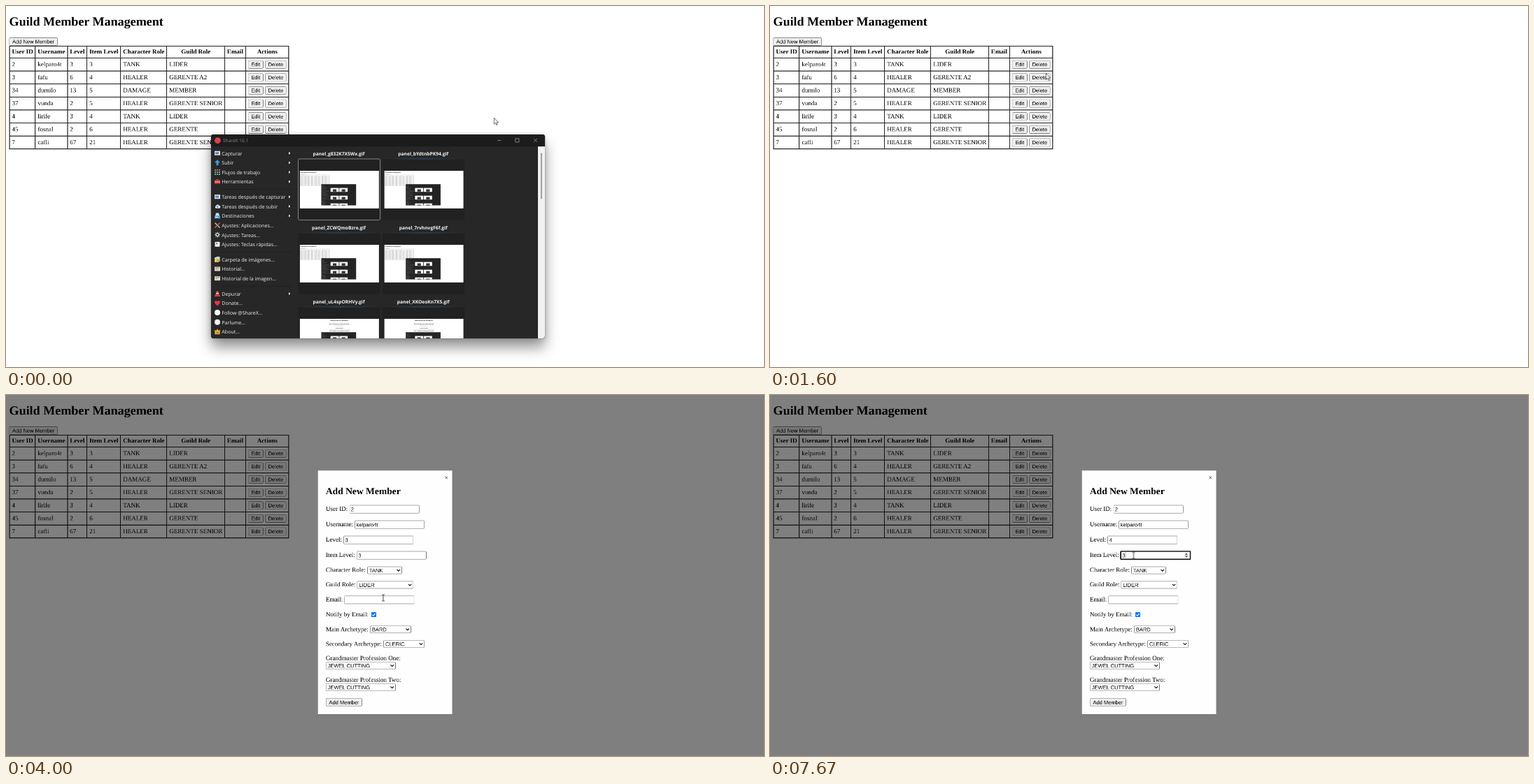
These frames come from a looping animation (1083 by 517 pixels, 8000 ms). An HTML page:

```html
<!DOCTYPE html>
<html lang="en">
<head>
<meta charset="utf-8">
<title>Guild Member Management</title>
<style>
  html, body { margin: 0; width: 100%; height: 100%; overflow: hidden; background: #fff; }
  #stage { position: relative; width: 1083px; height: 517px; overflow: hidden; cursor: default; }
  /* The page is laid out and rastered at 1920 px, then shown reduced. */
  #page { position: absolute; width: 1920px; height: 917px; background: #fff; transform: scale(.5641); transform-origin: 0 0;
    will-change: transform; text-rendering: geometricPrecision; font: 16px/18px "Liberation Serif", serif; color: #000; }
  h1 { position: absolute; left: 8px; top: 21.4px; margin: 0; font-size: 32px; line-height: 37px; white-space: nowrap; }
  .btn, .box { box-sizing: border-box; display: inline-block; position: relative; white-space: pre;
    font: 13.333px/19px "Liberation Sans", Arial, sans-serif; border: 1px solid #767676; border-radius: 3px; }
  .btn { height: 21px; padding: 0 7px; background: #efefef; vertical-align: top; }
  .btn.pressed { background: #f5f5f5; border-color: #8d8d8d; }
  #add { position: absolute; left: 8px; top: 80px; }
  table { position: absolute; left: 8px; top: 101px; border-collapse: collapse; }
  th, td { border: 2px solid #222; padding: 5px; height: 18px; white-space: nowrap; text-align: left; }
  th { text-align: center; }
  td { height: 21px; }
  #modal { position: absolute; inset: 0 0 -10px; background: rgba(0, 0, 0, .5); }
  #dialog { position: absolute; left: 790px; top: 192px; width: 340px; height: 618px; background: #fefefe; }
  h2 { position: absolute; left: 20px; top: 40px; margin: 0; font-size: 24px; line-height: 27px; white-space: nowrap; }
  #close { position: absolute; right: 10px; top: 10px; }
  .row { position: absolute; left: 20px; display: flex; align-items: center; gap: 4px;
    transform: translateY(-50%); white-space: nowrap; }
  .box { height: 21px; width: 177px; padding-left: 3px; background: #fff; border-radius: 2px; }
  .select { height: 19px; line-height: 17px; padding-left: 4px; }
  .box svg { position: absolute; right: 2px; top: 1px; }
  .focus { border-color: #101010; box-shadow: 0 0 0 1px #101010, inset 0 0 0 1px #101010; }
  .caret { display: inline-block; width: 1px; height: 15px; background: #000; vertical-align: middle; margin-top: -2px; }
  .check { width: 13px; height: 13px; margin: -2px 0 0 3px; }
  #win { position: absolute; left: 293px; top: 184px; width: 476.5px; height: 291.5px; border-radius: 4px;
    overflow: hidden; background: #272727; box-shadow: 0 0 1px #000, 0 13px 19px rgba(0, 0, 0, .42), 0 1px 8px rgba(0, 0, 0, .15); }
  #win svg { display: block; font: 7.1px "Open Sans", "Noto Sans", sans-serif; }
  #cursor { position: absolute; left: 0; top: 0; overflow: visible; transform-origin: 0 0; }
</style>
</head>
<body>
<div id="stage">
  <div id="page">
    <h1>Guild Member Management</h1>
    <span class="btn" id="add">Add New Member</span>
    <table id="members"></table>
    <div id="modal"><div id="dialog"><span id="close">×</span><h2>Add New Member</h2></div></div>
  </div>
  <div id="win"></div>
  <svg id="cursor" width="20" height="20">
    <path id="arrow" d="M.5 .5V16.5L4.2 13 6.6 18.6 9 17.6 6.7 12.1H11.7Z" fill="#fff" stroke="#000"/>
    <path id="beam" d="M-3.5 -8H-1Q0 -8 0 -7Q0 -8 1 -8H3.5M0 -7V7M-3.5 8H-1Q0 8 0 7Q0 8 1 8H3.5" fill="none" stroke="#000" stroke-width="1.3"/>
  </svg>
</div>
<script>
const $ = id => document.getElementById(id);
const SCALE = 1083 / 1920;

// Member table
const heads = ["User ID", "Username", "Level", "Item Level", "Character Role", "Guild Role", "Email", "Actions"];
const members = [
  [2, "kelparo4t", 3, 3, "TANK", "LIDER"],
  [3, "fafu", 6, 4, "HEALER", "GERENTE A2"],
  [34, "durnilo", 13, 5, "DAMAGE", "MEMBER"],
  [37, "vunda", 2, 5, "HEALER", "GERENTE SENIOR"],
  [4, "lirife", 3, 4, "TANK", "LIDER"],
  [45, "fosnal", 2, 6, "HEALER", "GERENTE"],
  [7, "cafli", 67, 21, "HEALER", "GERENTE SENIOR"]
];
const button = text => `<span class="btn">${text}</span>`;
const cells = (tag, list) => `<tr>${list.map(c => `<${tag}>${c}</${tag}>`).join("")}</tr>`;
$("members").innerHTML = cells("th", heads) +
  members.map(m => cells("td", [...m, "", button("Edit") + " " + button("Delete")])).join("");

// Dialog form; y is the middle of each row on the page
const input = (text, id = "") => `<span class="box" id="${id}"><span class="value">${text}</span>` +
  (id && `<span class="caret"></span><svg class="spin" width="15" height="17"><path d="M2 1H13V16H2Z" fill="#efefef"/>` +
  `<path d="M4 7 7.5 3 11 7ZM4 10 7.5 14 11 10Z" fill="#444"/></svg>`) + `</span>`;
const select = (text, width) => `<span class="box select" style="width:${width}px">${text}` +
  `<svg width="12" height="15"><path d="M2 5.5 6 9.5 10 5.5" fill="none" stroke="#000" stroke-width="1.8"/></svg></span>`;
const check = `<svg class="check"><rect width="13" height="13" rx="2" fill="#0075ff"/>` +
  `<path d="M2.5 6.8 5.3 9.5 10.5 3.6" fill="none" stroke="#fff" stroke-width="2"/></svg>`;
const rows = [
  [289.5, "User ID:", input(2)],
  [328.5, "Username:", input("kelparo4t")],
  [367.5, "Level:", input(3, "level")],
  [406.5, "Item Level:", input(3, "item")],
  [444.5, "Character Role:", select("TANK", 88)],
  [481.5, "Guild Role:", select("LIDER", 143)],
  [519.5, "Email:", input("")],
  [558, "Notify by Email:", check],
  [595, "Main Archetype:", select("BARD", 104)],
  [632, "Secondary Archetype:", select("CLERIC", 104)],
  [669, "Grandmaster Profession One:", ""],
  [687, "", select("JEWEL CUTTING", 177)],
  [724, "Grandmaster Profession Two:", ""],
  [742, "", select("JEWEL CUTTING", 177)],
  [780, "", button("Add Member")]
];
$("dialog").innerHTML += rows.map(([y, label, control]) =>
  `<div class="row" style="top:${y - 192}px">${label && `<span>${label}</span>`}${control}</div>`).join("");

// Capture tool window, drawn in stage coordinates
const rect = (x, y, w, h, fill, more = "") => `<rect x="${x}" y="${y}" width="${w}" height="${h}" fill="${fill}" ${more}/>`;
const path = (d, fill, more = "") => `<path d="${d}" fill="${fill}" ${more}/>`;
const line = (d, color, width = 1, more = "") => path(d, "none", `stroke="${color}" stroke-width="${width}" ${more}`);
const dot = color => `<circle cx="4" cy="4" r="4" fill="${color}"/>`;
const text = (x, y, str, more = 'fill="#eee"') => `<text x="${x}" y="${y}" ${more}>${str}</text>`;
const icons = {
  screen: rect(0, 1, 8, 6, "#dfe6ee") + rect(1, 2.5, 5, 3, "#4f86bd"),
  up: path("M4 0 8 4H5.5V8H2.5V4H0Z", "#3f9be8"),
  grid: ["#e05a5a", "#5aa0e0", "#62c06a"].map((c, i) => [0, 3, 6].map(x => rect(x, i * 3, 2, 2, c)).join("")).join(""),
  toolbox: rect(0, 2, 8, 5, "#d8403c") + rect(0, 4, 8, .8, "#f3d9d4") + line("M2.5 2V1H5.5V2", "#d8403c"),
  cloud: path("M2 7A2 2 0 0 1 2 3.4A2.4 2.4 0 0 1 6.4 3A2 2 0 0 1 6.4 7Z", "#e4eaf2") + path("M4 3 5.6 5H4.6V7H3.4V5H2.4Z", "#4a85c0"),
  drive: rect(0, 4, 8, 4, "#4d9be6") + path("M2 0H6L7 4H1Z", "#cfe2f5") + rect(1, 5.5, 4, 1, "#e8f2fc"),
  tools: line("M.5 .5 7.5 7.5", "#ccc", 1.3) + line("M7.5 .5 .5 7.5", "#d8594f", 1.4),
  gear: `<circle cx="4" cy="4" r="2" fill="none" stroke="#ddd" stroke-width="1.3"/>` +
    line("M4 0V1.6M4 6.4V8M0 4H1.6M6.4 4H8M1.2 1.2 2.3 2.3M5.7 5.7 6.8 6.8M6.8 1.2 5.7 2.3M2.3 5.7 1.2 6.8", "#ddd"),
  key: rect(.5, .5, 7, 7, "#eee", 'rx="1"') + rect(2, 2, 2, 2, "#777"),
  folder: rect(0, 1, 6, 7, "#e8c860") + rect(2.5, 0, 5, 5, "#b9d7f0") + rect(3, 4, 5, 3, "#d0a83c"),
  list: rect(0, 1, 8, 6, "#e4dccb") + rect(1, 2, 6, 1, "#a58a60") + rect(1, 4, 4, 1, "#999"),
  cone: path("M3 0H5L7 6.5H1Z", "#e0473c") + rect(0, 6.5, 8, 1.5, "#e0473c") + rect(2, 3, 4, 1.2, "#f5e7e2"),
  heart: path("M4 8C-2 3.5 .3 .4 2.2 .6Q3.5 .7 4 2Q4.5 .7 5.8 .6C7.7 .4 10 3.5 4 8Z", "#e8304a"),
  white: dot("#fff"),
  pale: dot("#f2f2f6"),
  crown: path("M0 1 2 3 4 0 6 3 8 1 7.5 8H.5Z", "#e3b341") + rect(2, 5, 4, 1.5, "#b5651d")
};
const menu = [
  [211, ["Capturar", "screen", 1], ["Subir", "up", 1], ["Flujos de trabajo", "grid", 1], ["Herramientas", "toolbox", 1]],
  [273.5, ["Tareas después de capturar", "screen", 1], ["Tareas después de subir", "cloud", 1], ["Destinaciones", "drive", 1],
    ["Ajustes: Aplicaciones...", "tools"], ["Ajustes: Tareas...", "gear"], ["Ajustes: Teclas rápidas...", "key"]],
  [363.2, ["Carpeta de imágenes...", "folder"], ["Historial...", "list"], ["Historial de la imagen...", "list"]],
  [412.2, ["Depurar", "cone", 1], ["Donate...", "heart"], ["Follow @ShareX...", "white"], ["Parlume...", "pale"], ["About...", "crown"]]
];
const menuItem = ([label, icon, sub], y) => `<g transform="translate(298 ${y - 4.3})">${icons[icon]}</g>` +
  text(308.3, y + 2.6, label) + (sub ? path(`M404 ${y - 2.3}L406.3 ${y - .2} 404 ${y + 1.9}Z`, "#eee") : "");
const menuGroup = ([y, ...items], i) => items.map((item, k) => menuItem(item, y + k * 13.6)).join("") +
  (i ? line(`M308 ${y - 11}H409`, "#1d1d1d", .7) : "");

// Miniatures of the stage itself
const miniWindow = rect(293, 184, 477, 291, "#242424") +
  [0, 1, 2].map(r => [420, 541].map(x => rect(x, 236 + r * 106, 113, r < 2 ? 53 : 27, "#fff") +
    rect(x + 31, 254 + r * 106, 50, r < 2 ? 32 : 9, "#333")).join("")).join("") +
  menu.map(([y, ...items]) => items.map((item, k) =>
    line(`M300 ${y + k * 13.6}h${12 + item[0].length * 3.5}`, "#777", 3)).join("")).join("");
const label = (x, y, size, str, more = "") => `<text x="${x}" y="${y}" font-size="${size}" font-weight="700" ` +
  `font-family="Liberation Serif, serif" ${more}>${str}</text>`;
const columns = [5, 42, 88, 115.5, 164, 230, 312.5, 342.5, 405];
const tableLines = columns.map(x => `M${x} 57V205`).join("") + "M5 57H405" +
  members.map((m, i) => `M5 ${74.5 + i * 18.6}H405`).join("") + "M5 205H405";
const shots = `<defs><g id="guild">${rect(0, 0, 1083, 517, "#fff")}${label(5, 29, 18, "Guild Member Management")}
  ${rect(5, 45, 69, 12, "#ddd")}${line(tableLines, "#555", 1.2)}
  ${members.map((m, i) => line(`M9 ${84 + i * 18.6}H400`, "#777", 3, 'stroke-dasharray="26 22"')).join("")}${miniWindow}</g>
  <g id="info">${rect(0, 0, 1083, 517, "#fff")}${label(541, 32, 22, "Información de Miembros", 'text-anchor="middle"')}
  ${label(541, 72, 16, "Buscar miembro por nombre del gremio", 'text-anchor="middle"')}${line("M480 95H600", "#999", 4)}
  ${label(541, 130, 16, "Lista de niveles", 'text-anchor="middle"')}${line("M400 148H690", "#999", 3)}
  ${label(541, 174, 15, "Lista y detalles de los miembros del gremio", 'text-anchor="middle"')}${miniWindow}</g>
  <linearGradient id="glow"><stop stop-color="#2b5b8a" stop-opacity="0"/><stop offset=".5" stop-color="#2f5f8f"/>
  <stop offset="1" stop-color="#2b5b8a" stop-opacity="0"/></linearGradient></defs>`;
const files = ["g832K7X5Wx", "bYdtnbPK94", "ZCWQmoBzre", "7rvhnvgF6f", "uL4spORHVy", "XKOeoKn7X5"];
const tile = (name, i) => {
  const x = 417.5 + i % 2 * 120.7, y = 219 + (i >> 1) * 106;
  return text(x + 58, y - 5.2, `panel_${name}.gif`, 'fill="#f4f4f4" text-anchor="middle" font-size="6.7" font-weight="700"') +
    rect(x, y, 117, 87.5, "#212121", i ? 'rx="2"' : 'rx="2" stroke="#9c9c9c" stroke-width=".8"') +
    (i ? rect(x, y - .4, 117, .8, "url(#glow)") : "") +
    `<use href="#${i < 4 ? "guild" : "info"}" transform="translate(${x + 2.4} ${y + 17}) scale(.1043)"/>`;
};
$("win").innerHTML = `<svg width="476.5" height="291.5" viewBox="293 184 476.5 291.5" text-rendering="geometricPrecision">
  ${shots}${rect(293, 184, 477, 17.2, "#1c1c1c")}
  <circle cx="302.4" cy="192.6" r="4.4" fill="#d8434c"/>
  ${text(310, 195, "ShareX 16.1", 'fill="#8a8a8a" font-size="6.6"')}
  ${line("M702 192.5H707.5M727.8 189.8H733V195H727.8ZM754 189.8 759 194.8M759 189.8 754 194.8", "#a8a8a8", .7)}
  ${menu.map(menuGroup).join("")}${files.map(tile).join("")}
  ${rect(760, 201.2, 10, 275, "#f1f1f1")}${rect(764.2, 210.5, 1.5, 66, "#858585", 'rx=".7"')}</svg>`;

// Pointer track: time, x, y
const track = [
  [0, 697, 160], [67, 694, 160], [200, 660, 162], [333, 590, 166], [467, 525, 169], [600, 487, 168],
  [733, 450, 152], [867, 419, 133], [1000, 401, 117], [1133, 384, 104], [1333, 372, 96.5], [1400, 372, 96.5],
  [1600, 394, 96], [2000, 347, 79], [2267, 353, 80], [2333, 353, 80], [2533, 355, 82], [3000, 355, 82],
  [3267, 405, 125], [3467, 488, 185], [3667, 540, 252], [3800, 548, 324], [3867, 546, 321],
  [4000, 539, 290.5], [4267, 530, 254], [4467, 522, 231], [4733, 509, 215], [5067, 502, 207.7],
  [6467, 502, 207.7], [6533, 515, 209.5], [7000, 515, 209.5], [7333, 519, 229], [7467, 519, 229],
  [7533, 519.5, 229.7], [8000, 519.5, 229.7]
];
const pointerAt = t => {
  const i = Math.max(1, track.findIndex(p => p[0] >= t));
  const [a, b] = [track[i - 1], track[i]];
  const k = (t - a[0]) / (b[0] - a[0]);
  return [a[1] + (b[1] - a[1]) * k, a[2] + (b[2] - a[2]) * k];
};
const inside = ([x, y], left, top, right, bottom) => x >= left && x <= right && y >= top && y <= bottom;
const between = (t, from, to) => t >= from && t < to;
const show = (element, on) => { element.style.visibility = on ? "visible" : "hidden"; };

const firstEdit = document.querySelector("td .btn");
const fields = ["level", "item"].map($);
const TICK = 200 / 3;

function draw(time) {
  const t = Math.floor((time + 4) / TICK) * TICK;
  const open = t >= 2725, p = pointerAt(t);

  const fade = Math.min(1, t / 200);
  $("win").style.opacity = 1 - fade;
  $("win").style.transform = `scale(${1 - fade * .06})`;
  show($("win"), fade < 1);
  show($("modal"), open);
  firstEdit.classList.toggle("pressed", between(t, 2530, 2725));

  const hover = [inside(p, 482, 201, 582, 213.5), inside(p, 501, 223, 601, 235.5)].map(h => open && h);
  const focus = [between(t, 5260, 7660), t >= 7660];
  const caret = [between(t, 5260, 5860) || between(t, 6460, 7060), t >= 7660];
  fields.forEach((field, i) => {
    field.classList.toggle("focus", focus[i]);
    show(field.querySelector(".caret"), caret[i]);
    show(field.querySelector(".spin"), hover[i] || focus[i]);
  });
  fields[0].querySelector(".value").textContent = t < 6195 ? "3" : t < 6660 ? "" : "4";

  const beam = hover[0] || hover[1] || open && inside(p, 483, 287, 583, 299);
  $("arrow").style.display = beam ? "none" : "";
  $("beam").style.display = beam ? "" : "none";
  show($("cursor"), !between(t, 5995, 6525));
  $("cursor").style.transform = `translate(${p[0]}px, ${p[1]}px) scale(${SCALE})`;
}

function frame() {
  draw(performance.now() % 8000);
  requestAnimationFrame(frame);
}
frame();
</script>
</body>
</html>
```
